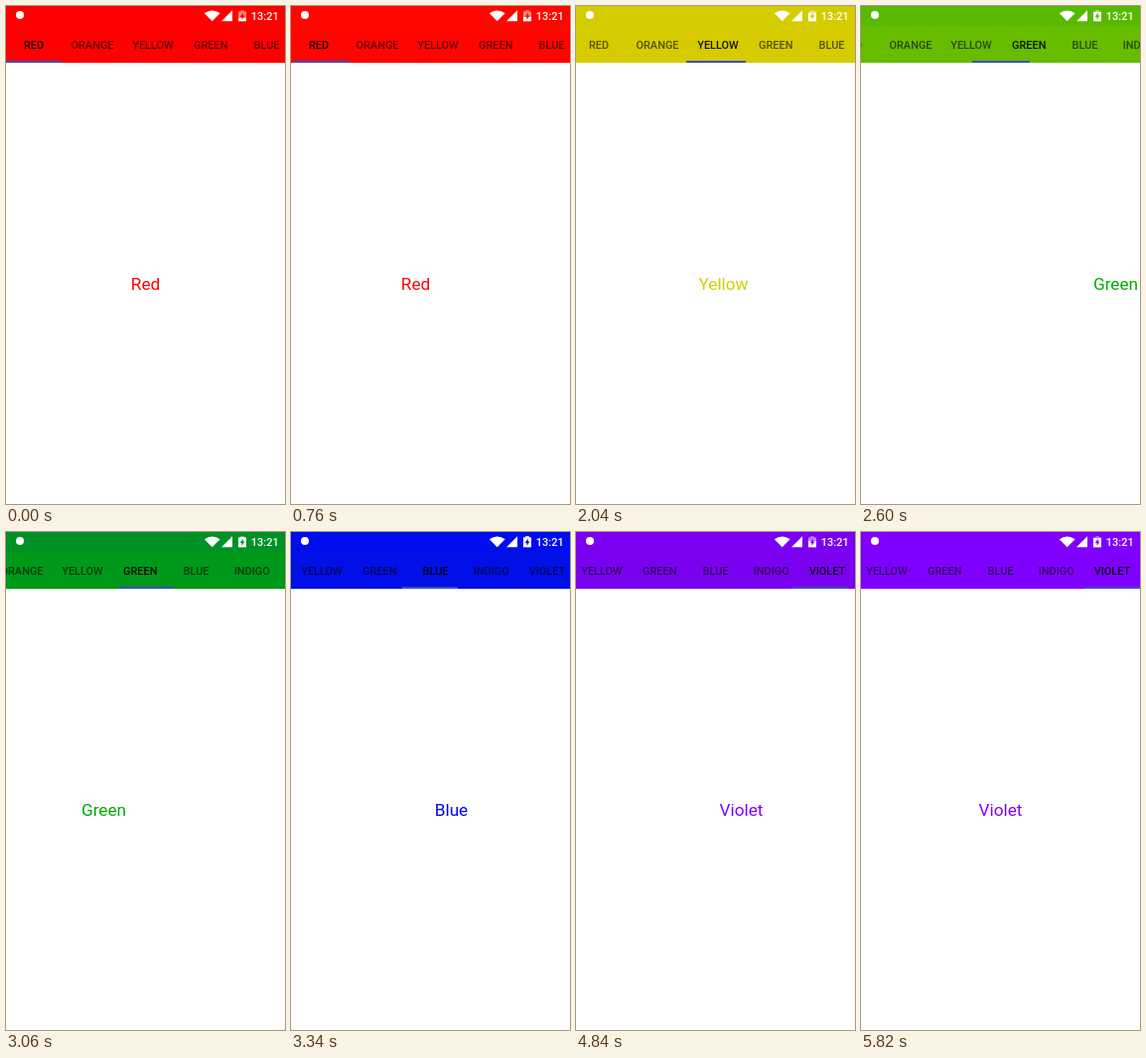
An HTML page with a canvas that plays this animation: 281x500 px, repeating every 5860 ms.

```html
<!DOCTYPE html>
<html lang="en">
<head>
<meta charset="utf-8">
<title>Rainbow tabs</title>
<style>
html, body { margin: 0; height: 100%; overflow: hidden; background: #fff; }
canvas { display: block; }
</style>
</head>
<body>
<canvas id="stage" width="281" height="500"></canvas>
<script>
const ctx = document.getElementById('stage').getContext('2d');
const W = 281, H = 500, LOOP = 5860;
const STATUS = 20, HEADER = 57;
const SETTLE = 600, LAG = 20;

const pages = [
  { name: 'Red', rgb: [255, 0, 0] },
  { name: 'Orange', rgb: [255, 127, 0] },
  { name: 'Yellow', rgb: [211, 206, 0] },
  { name: 'Green', rgb: [0, 170, 0] },
  { name: 'Blue', rgb: [0, 0, 255] },
  { name: 'Indigo', rgb: [75, 0, 130] },
  { name: 'Violet', rgb: [128, 0, 255] }
];
const edges = [0, 56.2, 117.8, 178.2, 234.4, 290.6, 346.8, 403];

// Each swipe: touch time, release time, share of the page dragged
const swipes = [
  [590, 944, .234],
  [1570, 1800, .65],
  [2350, 2580, .506],
  [2955, 3160, .554],
  [3560, 3765, .55],
  [4470, 4670, .5]
];

const clamp = (v, lo, hi) => Math.min(hi, Math.max(lo, v));
const lerp = (a, b, k) => a + (b - a) * k;
const css = rgb => `rgb(${rgb.map(Math.round)})`;

function swipe(t, [down, up, share]) {
  if (t <= down) return 0;
  if (t < up) return share * ((t - down) / (up - down)) ** 2;
  const left = Math.max(0, 1 - (t - up) / SETTLE);
  return 1 - (1 - share) * left ** 5;
}

const position = t => swipes.reduce((sum, s) => sum + swipe(t, s), 0);

// Interpolates value(i) between the neighbouring pages
function between(pos, value) {
  const i = Math.floor(pos), j = Math.min(i + 1, pages.length - 1);
  return lerp(value(i), value(j), pos - i);
}

const colorAt = pos => css([0, 1, 2].map(c => between(pos, i => pages[i].rgb[c])));
const center = i => (edges[i] + edges[i + 1]) / 2;

function rect(x, y, w, h, color) {
  ctx.fillStyle = color;
  ctx.fillRect(x, y, w, h);
}

function text(str, x, y, font, color, align = 'center') {
  ctx.font = font + ' Roboto, sans-serif';
  ctx.textAlign = align;
  ctx.fillStyle = color;
  ctx.fillText(str, x, y);
}

function shape(path, color) {
  ctx.fillStyle = color;
  ctx.fill(new Path2D(path));
}

function drawPages(pos) {
  pages.forEach((p, i) =>
    text(p.name, W / 2 + Math.round((i - pos) * W), 285.3, '17.2px', css(p.rgb)));
}

function drawTabs(pos) {
  rect(0, 0, W, HEADER, colorAt(pos));
  const scroll = Math.round(clamp(between(pos, center) - W / 2, 0, edges[7] - W));
  const left = Math.round(between(pos, i => edges[i]) - scroll);
  const right = Math.round(between(pos, i => edges[i + 1]) - scroll);
  rect(left, HEADER - 2, right - left, 2, '#3f51b5');
  pages.forEach((p, i) => {
    const color = i === Math.round(pos) ? 'rgba(0,0,0,.9)' : 'rgba(0,0,0,.6)';
    text(p.name.toUpperCase(), center(i) - scroll, 42.7, '500 10.93px', color);
  });
}

function drawStatus(pos, t) {
  const color = colorAt(pos);
  rect(0, 0, W, STATUS, color);
  shape('M18 9a4 4 0 1 1-8 0a4 4 0 1 1 8 0z', '#fff');
  shape('M207.7 15.2L199.8 7.3Q207.7 1.7 215.6 7.3z', '#fff');
  shape('M217 15.2H228V4.2z', '#fff');

  // Charging battery fills up step by step
  const battery = new Path2D('M234 5.5H236.3V4.2H239.7V5.5H242V15.2H234z');
  const top = Math.max(4, 12 - Math.floor(t % 3360 / 408));
  ctx.fillStyle = 'rgba(255,255,255,.5)';
  ctx.fill(battery);
  ctx.save();
  ctx.clip(battery);
  rect(234, top, 8, 16 - top, '#fff');
  ctx.restore();
  shape('M238.7 6.5L235.7 11H237.5V14L240.4 9.6H238.7z', color);

  text('13:21', 274.6, 14, '500 10.93px', '#fff', 'right');
}

function draw(now) {
  const t = now % LOOP;
  const pos = position(t);
  rect(0, 0, W, H, '#fff');
  drawPages(pos);
  drawTabs(position(t - LAG));
  drawStatus(pos, t);
}

const start = performance.now();
function tick() {
  draw(performance.now() - start);
  requestAnimationFrame(tick);
}
tick();
</script>
</body>
</html>
```
